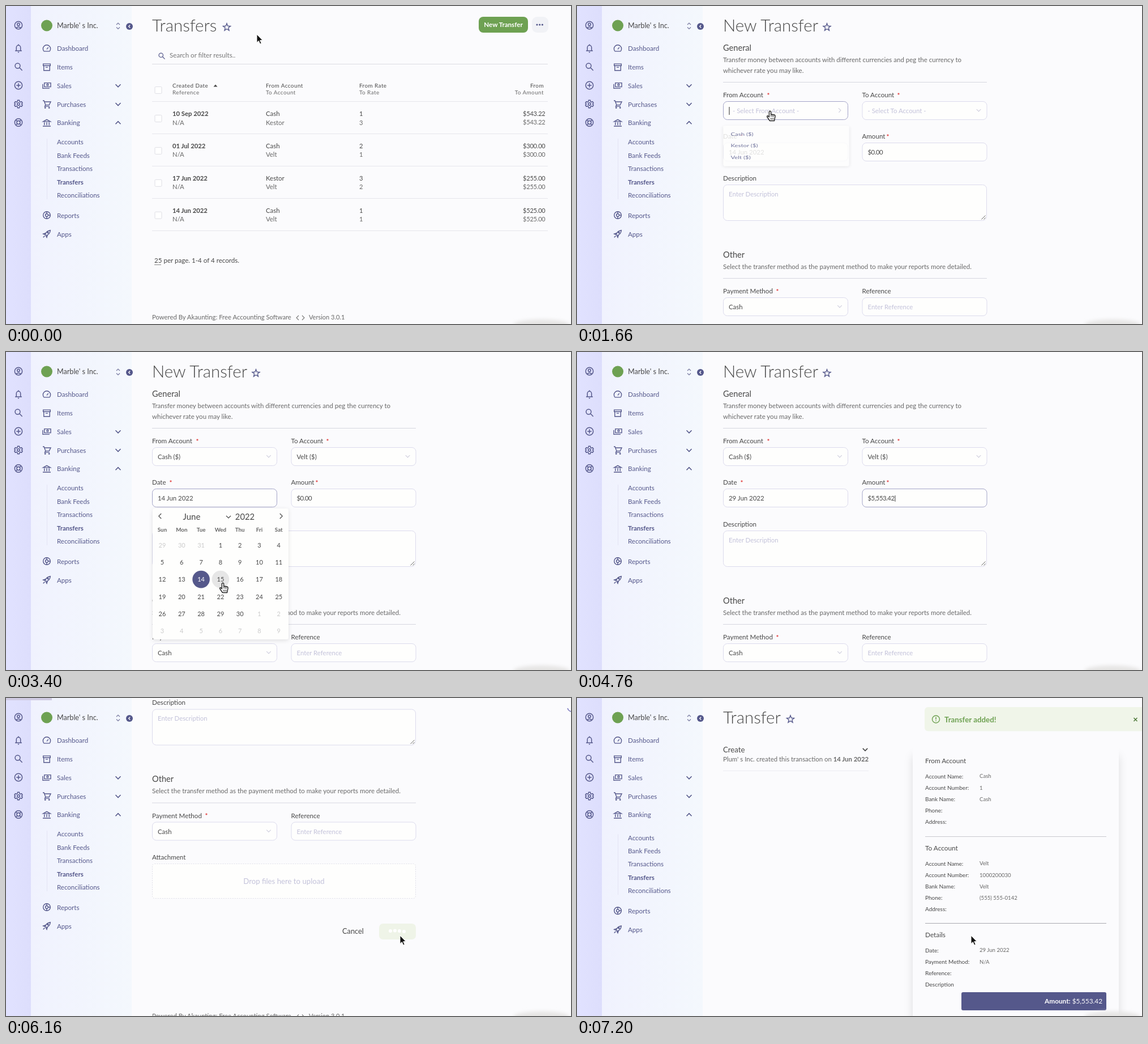
An HTML page that plays this animation: 998x561 px, repeating every 7.5 s.

```html
<!DOCTYPE html>
<html lang="en">
<head>
<meta charset="utf-8">
<title>Transfers</title>
<style>
html, body { margin: 0; width: 100%; height: 100%; overflow: hidden; background: #fbfbfd; }
svg { display: block; font-family: Lato, "Open Sans", sans-serif; white-space: pre; }
</style>
</head>
<body>
<svg id="stage" width="998" height="561" viewBox="0 0 998 561"></svg>
<script>
const LOOP = 7500, INK = '#484848', SOFT = '#686868', NAVY = '#55588b', GREEN = '#6ea152', HINT = '#c3c2da';
const stage = document.getElementById('stage');

const clamp = v => Math.max(0, Math.min(1, v));
const prog = (t, a, b) => clamp((t - a) / (b - a));
const ease = p => p < .5 ? 2 * p * p : 1 - 2 * (1 - p) ** 2;
const within = (t, a, b) => t >= a && t < b;

// y is the optical middle of the line
const text = (x, y, s, size = 11.6, fill = INK, more = '') =>
  `<text x="${x}" y="${y + size * .35}" font-size="${size}" fill="${fill}" ${more}>${s}</text>`;
const BOLD = 'font-weight="700"', MID = 'text-anchor="middle" ', END = 'text-anchor="end" ';
const rect = (x, y, w, h, fill, r = 0, more = '') =>
  `<rect x="${x}" y="${y}" width="${w}" height="${h}" rx="${r}" fill="${fill}" ${more}/>`;
const circle = (x, y, r, fill, more = '') => `<circle cx="${x}" cy="${y}" r="${r}" fill="${fill}" ${more}/>`;
const line = (d, color = NAVY, w = 1, more = '') =>
  `<path d="${d}" fill="none" stroke="${color}" stroke-width="${w}" ${more}/>`;
const rule = (x1, x2, y, color = '#e6e6ec') => line(`M${x1} ${y}H${x2}`, color);
const chevron = (x, y, turn = 0, size = 4.5, color = NAVY, w = 1.6) =>
  line(`M${-size} ${-size / 2}L0 ${size / 2}L${size} ${-size / 2}`, color, w, `transform="translate(${x},${y}) rotate(${turn})"`);
const group = (inner, more) => `<g ${more}>${inner}</g>`;

const ring = (x, y, r) => `M${x - r} ${y}a${r} ${r} 0 1 0 ${2 * r} 0a${r} ${r} 0 1 0 ${-2 * r} 0`;
const ICONS = {
  user: ring(12, 12, 9) + ring(12, 10, 3) + 'M6 18.5q6-5 12 0',
  bell: 'M4 18h16M7 18v-8a5 5 0 0 1 10 0v8M12 2.5v2.5M10.5 21.5h3',
  search: ring(10, 10, 6) + 'M14.5 14.5L21 21',
  plus: ring(12, 12, 9) + 'M12 7v10M7 12h10',
  gear: ring(12, 12, 3) + 'M10 3h4l.6 3 2.2 1.2 2.8-1 2 3.4-2.1 2.1 2.1 2.7-2 3.4-2.8-1-2.2 1.2-.6 3h-4l-.6-3-2.2-1.2-2.8 1-2-3.4 2.1-2.7-2.1-2.1 2-3.4 2.8 1 2.2-1.2z',
  help: ring(12, 12, 9) + ring(12, 12, 4) + 'M6 6l3 3M15 15l3 3M18 6l-3 3M9 15l-3 3',
  speed: 'M5 19a9.5 9.5 0 1 1 14 0zM12 14l4-5',
  box: 'M4.5 8.5v12h15v-12M3 4h18v4.5H3zM9 12.5h6',
  money: 'M6 5h16v10H6zM2 8v11h17' + ring(14, 10, 2.2),
  cart: 'M2 3h3l4 11h9l4-8H6.5M9 14l-2 3.5h12' + ring(8, 21, 1) + ring(18, 21, 1),
  bank: 'M3 9L12 4l9 5zM6 11v7M12 11v7M18 11v7M2 20.5h20',
  donut: ring(12, 12, 9) + ring(12, 12, 3.5) + 'M12 3v5.5M12 15.5v5.5M15.5 12h5.5',
  rocket: 'M8 14q2-9 13-11q-1 11-11 13zM9 10l-6 2 4.5 2M14 15l-2 6-2.5-4.5M3 21l4-4' + ring(15, 9, 1.3)
};
const icon = (name, x, y, s = .74, w = 2) =>
  line(ICONS[name], NAVY, w, `transform="translate(${x - 12 * s},${y - 12 * s}) scale(${s})"`);
const star = (x, y) => {
  const pts = [];
  for (let i = 0; i < 10; i++) {
    const a = i * Math.PI / 5, r = i % 2 ? 2.9 : 6.8;
    pts.push((x + r * Math.sin(a)).toFixed(1) + ' ' + (y + .6 - r * Math.cos(a)).toFixed(1));
  }
  return line('M' + pts.join('L') + 'Z', NAVY, 1.4);
};
const title = (s, starX) => text(258, 34.5, s, 29.5, INK, 'font-weight="300"') + star(starX, 37);

const DEFS = `<defs>
<linearGradient id="rail"><stop stop-color="#e1e2ff"/><stop offset="1" stop-color="#dddefc"/></linearGradient>
<linearGradient id="menu"><stop stop-color="#f0f2fe"/><stop offset="1" stop-color="#f4f8fd"/></linearGradient>
<filter id="shade" x="-20%" y="-20%" width="140%" height="150%"><feDropShadow dx="0" dy="2" stdDeviation="3.5" flood-color="#000" flood-opacity=".11"/></filter>
<filter id="soft" x="-20%" y="-20%" width="140%" height="140%"><feDropShadow dx="0" dy="16" stdDeviation="8" flood-color="#000" flood-opacity=".12"/></filter>
<filter id="blur" x="-30%" y="-80%" width="160%" height="260%"><feGaussianBlur stdDeviation="3"/></filter>
</defs>`;

function sidebar(shift) {
  let s = rect(0, 0, 44, 561, 'url(#rail)') + rect(44, 0, 178, 561, 'url(#menu)');
  ['user', 'bell', 'search', 'plus', 'gear', 'help'].forEach((n, i) =>
    s += icon(n, 22, [34, 74.5, 107, 140, 173, 205.5][i]));
  s += circle(72, 34.5, 10, GREEN) + text(90, 35, "Marble' s Inc.", 12.6);
  s += line('M195 33l3-3 3 3M195 37.5l3 3 3-3', '#77789f', 1.2);
  s += circle(218, 36, 6, NAVY) + line('M219.2 33.5l-2.5 2.5 2.5 2.5', '#fff', 1.3);
  [['speed', 'Dashboard'], ['box', 'Items'], ['money', 'Sales'], ['cart', 'Purchases'], ['bank', 'Banking']].forEach(([n, name], i) => {
    const y = 75 + i * 32.75;
    s += icon(n, 72, y, .7) + text(90, y + .3, name, 11.6, NAVY);
    if (i > 1) s += chevron(198, y, i == 4 ? 180 : 0);
  });
  let sub = line('M72.5 234V341', '#e3e4f3');
  ['Accounts', 'Bank Feeds', 'Transactions', 'Transfers', 'Reconciliations'].forEach((name, i) =>
    sub += text(90, 240.3 + i * 23.4, name, 11.5, NAVY, i == 3 ? BOLD : ''));
  sub += icon('donut', 72, 369, .7) + text(90, 369.5, 'Reports', 11.6, NAVY);
  sub += icon('rocket', 72, 402, .7) + text(90, 402.5, 'Apps', 11.6, NAVY);
  return s + group(sub, `transform="translate(0,${shift})"`);
}

const footer = y => text(258, y, 'Powered By Akaunting: Free Accounting Software', 11.3, SOFT) +
  line(`M517 ${y - 3}l-4 4 4 4M523 ${y - 3}l4 4-4 4`, '#777', 1.1) + text(535, y, 'Version 3.0.1', 11, SOFT);

function listPage(t) {
  let s = title('Transfers', 390);
  s += rect(835, 19, 87, 28, t > 220 ? '#638f4a' : GREEN, 8) + text(878.5, 33, 'New Transfer', 11.6, '#fff', MID + BOLD);
  s += rect(929, 19, 29, 28, '#f1f2f6', 9);
  for (let i = 0; i < 3; i++) s += circle(938 + i * 4.7, 33, 1.6, NAVY);
  s += icon('search', 275, 88, .62) + text(289, 87, 'Search or filter results..', 11.6, '#777');
  s += rule(258, 957, 102.5, '#dcdce2');
  const check = y => rect(263, y - 6, 12, 12, '#fff', 1.5, 'stroke="#dedee4"');
  const pair = (x, y, a, b, gap, size, more = '', strong = '') =>
    text(x, y, a, size, INK, more + strong) + text(x, y + gap, b, size, SOFT, more);
  const head = 'letter-spacing=".45" ';
  s += check(148.5) + `<path d="M366.5 142.5l3.5-4 3.5 4z" fill="${INK}"/>`;
  [['Created Date', 'Reference'], ['From Account', 'To Account'], ['From Rate', 'To Rate']].forEach(([a, b], i) =>
    s += pair(294 + i * 165, 140.5, a, b, 12.5, 9.9, head));
  s += pair(950, 140.5, 'From', 'To Amount', 12.5, 9.9, head + END) + rule(258, 957, 168.5);
  [['10 Sep 2022', 'Cash', 'Kestor', 1, 3, '$543.22'], ['01 Jul 2022', 'Cash', 'Velt', 2, 1, '$300.00'],
   ['17 Jun 2022', 'Kestor', 'Velt', 3, 2, '$255.00'], ['14 Jun 2022', 'Cash', 'Velt', 1, 1, '$525.00']].forEach((r, i) => {
    const y = 190 + i * 56.9;
    s += check(y + 8.5) + pair(294, y, r[0], 'N/A', 15.6, 11.3, '', BOLD) + pair(459, y, r[1], r[2], 15.6, 11.4) +
      pair(624, y, r[3], r[4], 15.6, 11.2) + pair(952.5, y, r[5], r[5], 15.6, 11, 'letter-spacing="-.2" ' + END) +
      rule(258, 957, Math.round(y + 35) + .5);
  });
  return s + text(262, 449, '25 per page. 1-4 of 4 records.') + rule(262, 274, 456.5, '#888') + footer(549);
}

// Opening amounts of the two account lists
const openFrom = t => t < 1960 ? prog(t, 1530, 1710) : 1 - prog(t, 1960, 2060);
const openTo = t => t < 2720 ? prog(t, 2350, 2530) : 1 - prog(t, 2720, 2820);

const label = (x, y, s, starX) => text(x, y, s) + (starX ? text(starX, y + 1, '*', 10.5, '#e02d2d', MID + BOLD) : '');
const box = (x, y, w, h, focus) => rect(x, y, w, h, '#fefefd', 7, `stroke="${focus ? '#a3a4c8' : '#dcdbed'}"`);
function field(x, y, s, o = {}) {
  const shift = o.open ? 7 : 0;
  let out = box(x + .5, y + .5, 220, 32, o.focus) + text(x + 10 + shift, y + 17.5, s, 11.4, o.hint ? HINT : INK, o.more);
  if (o.open) out += line(`M${x + 11} ${y + 10}v14`, INK, 1.2);
  if (o.select) out += chevron(x + 206, y + 16, -180 * (o.open || 0) ** 2, 3.8, '#cfcedd', 1.1);
  return out;
}
function dropdown(x, p) {
  if (!p) return '';
  let s = rect(0, 0, 222, 98, '#fefefd', 4, 'filter="url(#shade)"');
  ['Cash ($)', 'Kestor ($)', 'Velt ($)'].forEach((v, i) => s += text(13, 20.5 + i * 28.3, v, 11.4, NAVY));
  return group(s, `transform="translate(${x},211) scale(1,${p})" opacity="${Math.min(1, .15 + p * .95)}"`);
}

function calendar(t, cur) {
  const p = t < 3680 ? prog(t, 3010, 3110) : 1 - prog(t, 3680, 3740);
  if (!p) return '';
  let s = rect(259, 276, 240, 231, '#fefefd', 4, 'filter="url(#shade)"');
  s += chevron(272, 289.5, 90, 4.5, INK, 1.1) + chevron(486, 289.5, -90, 4.5, INK, 1.1) + chevron(393, 291, 0, 4, INK, 1.2);
  s += text(328, 291, 'June', 15, INK, MID) + text(422, 291, '2022', 14.8, INK, MID);
  const hoverCol = Math.round((cur.x - 276) / 34.3), hoverRow = Math.round((cur.y - 340.5) / 30.3);
  for (let c = 0; c < 7; c++) {
    const x = 276 + c * 34.3;
    s += text(x, 313.5, ['Sun', 'Mon', 'Tue', 'Wed', 'Thu', 'Fri', 'Sat'][c], 9.8, '#666', MID + BOLD);
    for (let r = 0; r < 6; r++) {
      const n = r * 7 + c - 2, y = 340.5 + r * 30.3, out = n < 1 || n > 30;
      if (n == 14) s += circle(x, y, 15.3, NAVY);
      else if (c == hoverCol && r == hoverRow) s += circle(x, y, 15.3, '#e6e6e6');
      s += text(x, y + .5, n < 1 ? n + 31 : n > 30 ? n - 30 : n, 11, n == 14 ? '#fff' : out ? '#cbcbcb' : INK, MID);
    }
  }
  return group(s, `opacity="${p}"`);
}

const AMOUNTS = ['$5', '$55', '$555', '$5,553.4', '$5,553.42'];
function formPage(t, cur) {
  const from = openFrom(t), to = openTo(t);
  const typed = t < 4160 ? '$0.00' : AMOUNTS[Math.min(4, Math.floor((t - 4160) / 60))];
  const amountFocus = t >= 3930;
  const caret = amountFocus && !within(t, 4600, 4760) ? '<tspan fill="#111">|</tspan>' : '';
  let s = title('New Transfer', 441.5);
  s += text(258, 74, 'General', 14.6) + text(258, 94.5, 'Transfer money between accounts with different currencies and peg the currency to', 11.5, SOFT) +
    text(258, 113.5, 'whichever rate you may like.', 11.5, SOFT) + rule(258, 724, 134.5, '#d6d7e0');
  s += label(258, 157, 'From Account', 338) + label(503.5, 157, 'To Account', 568);
  s += field(258, 168, t < 1960 ? '- Select From Account -' : 'Cash ($)', { select: 1, open: from, focus: within(t, 1530, 1990), hint: t < 1960 });
  s += field(503.5, 168, t < 2720 ? '- Select To Account -' : 'Velt ($)', { select: 1, open: to, focus: within(t, 2350, 2760), hint: t < 2720 });
  s += label(258, 230, 'Date', 291) + label(503.5, 230, 'Amount', 549);
  s += field(258, 241, t < 3680 ? '14 Jun 2022' : '29 Jun 2022', { focus: within(t, 3000, 3740) });
  s += field(503.5, 241, typed + caret, { focus: amountFocus, more: 'letter-spacing="-.5"' });
  s += label(258, 303.5, 'Description') + box(258.5, 315.5, 465, 63, false) + text(268, 332, 'Enter Description', 11.4, HINT);
  s += line('M714.5 376.5l7-7M718.5 376.5l3-3', '#666');
  s += text(258, 438.5, 'Other', 14.6) + text(258, 459.5, 'Select the transfer method as the payment method to make your reports more detailed.', 11.5, SOFT) +
    rule(258, 724, 480.5, '#d6d7e0');
  s += label(258, 503, 'Payment Method', 354) + label(503.5, 503, 'Reference');
  s += field(258, 514, 'Cash', { select: 1 }) + field(503.5, 514, 'Enter Reference', { hint: 1 });
  s += label(258, 576, 'Attachment') + rect(258.5, 588, 465, 61, '#fefefd', 4, 'stroke="#dfdfe8" stroke-dasharray="2 2"') +
    text(491, 619, 'Drop files here to upload', 13.2, HINT, MID);
  const saving = prog(t, 5680, 5780);
  s += text(594, 707.5, 'Cancel', 12.8) + rect(659, 693.5, 65, 28, '#eff4e8', 7) +
    group(rect(659, 693.5, 65, 28, t > 5520 ? '#638f4a' : GREEN, 7) + text(691.5, 707.5, 'Save', 11.8, '#fff', MID + BOLD), `opacity="${1 - saving}"`);
  if (saving) for (let i = 0; i < 4; i++) s += circle(679 + i * 8, 707 + Math.sin(t / 90 - i), 3, '#fff', `opacity="${saving}"`);
  s += footer(857);
  s += dropdown(258.5, from) + dropdown(503.5, to) + calendar(t, cur);
  const scroll = 295.5 * (1 - (1 - prog(t, 4930, 5200)) ** 2);
  return group(s, `transform="translate(0,${-scroll})"`);
}

function resultPage(t) {
  let s = title('Transfer', 377);
  s += text(258, 91, 'Create', 13.2) + chevron(509, 91, 0, 4.2, INK) +
    text(258, 108, `Plum' s Inc. created this transaction on <tspan ${BOLD}>14 Jun 2022</tspan>`, 11.4, SOFT) + rule(258, 515, 128.5, '#ececf2');
  let card = rect(593, 85, 364, 500, '#fbfbfd', 8, 'filter="url(#soft)"');
  const section = (y, name, keys, values) => {
    card += text(615, y, name, 11.8);
    keys.forEach((k, i) => card += text(615, y + 27 + i * 20.2, k, 10) + text(711, y + 27 + i * 20.2, values[i] || '', 9.6, SOFT));
  };
  const keys = ['Account Name:', 'Account Number:', 'Bank Name:', 'Phone:', 'Address:'];
  section(111, 'From Account', keys, ['Cash', '1', 'Cash']);
  section(265, 'To Account', keys, ['Velt', '1000200030', 'Velt', '(555) 555-0142']);
  section(418, 'Details', ['Date:', 'Payment Method:', 'Reference:', 'Description'], ['29 Jun 2022', 'N/A']);
  card += rule(615, 935, 244.5, '#c9c9cf') + rule(615, 935, 397.5, '#a9a9b0');
  card += rect(679, 519, 256, 32, NAVY, 3) + text(928, 535, `<tspan ${BOLD}>Amount:</tspan> $5,553.42`, 11.8, '#fff', END);
  s += group(card, `opacity="${prog(t, 6700, 6860)}"`);
  const p = prog(t, 6900, 7190);
  const toast = rect(614, 16, 392, 42.5, '#f0f5e9', 6) + circle(634, 37.5, 6.5, 'none', `stroke="${GREEN}" stroke-width="1.4"`) +
    line('M634 33.5v4.5M634 39.5v1.6', GREEN, 1.5) + text(649, 38, 'Transfer added!', 13.3, GREEN, BOLD) +
    line('M983.5 35l6 6M989.5 35l-6 6', '#4f7a3a', 1.5);
  return s + group(toast, `opacity="${p}" transform="translate(${40 * (1 - ease(p))},0)"`);
}

// Pointer stops: time, x, y
const PATH = [[60, 443, 50], [260, 878, 34], [1080, 878, 34], [1480, 341, 185], [1760, 341, 185], [1880, 300, 230], [2000, 300, 230],
  [2290, 578, 169], [2530, 578, 169], [2650, 545, 286], [2760, 545, 286], [3000, 400, 256], [3100, 400, 256], [3260, 383, 407],
  [3430, 383, 407], [3580, 379, 460], [3720, 379, 460], [3960, 581, 253], [5360, 581, 253], [5560, 696, 419]];
function pointerAt(t) {
  const i = PATH.findIndex(k => k[0] > t);
  if (i == 0) return { x: 443, y: 50 };
  if (i < 0) return { x: 696, y: 419 };
  const a = PATH[i - 1], b = PATH[i], p = ease(prog(t, a[0], b[0]));
  return { x: a[1] + (b[1] - a[1]) * p, y: a[2] + (b[2] - a[2]) * p };
}
function pointer(t, { x, y }) {
  if (within(t, 4160, 5360)) return '';
  const at = `transform="translate(${x},${y})" stroke-linejoin="round"`;
  if (within(t, 3870, 4160)) return line('M-3-9q3 0 3 2V7q0 2-3 2M3-9q-3 0-3 2M0 7q0 2 3 2', '#222', 1.2, at);
  const arrow = t < 220 || within(t, 1130, 1420) || within(t, 5360, 5520) || t >= 5760;
  if (arrow) return `<path d="M0 0V14.5L3.4 11.4 5.7 17 8.2 16 5.8 10.6H10.3Z" fill="#111" stroke="#fff" ${at}/>`;
  return group('<path d="M-1.6 1.5Q0-1 1.6 1.5V6L7.500 7q1.800.6 1.500 3L7.500 17.500H-.5L-5 11q-1-2.500 1-2.200l2.400 2z" fill="#fff" stroke="#222" stroke-width="1.4"/>' +
    line('M1.6 6v4M3.8 7v3.5M6 7.500v3.500M1.500 12.500v3M3.700 12.500v3M5.900 12.500v3', '#222', .9), at);
}

function loader(t) {
  const span = [[2050, 2300, 2400, 2500], [2800, 3000, 3080, 3180], [5800, 6080, 6130, 6230]].find(r => within(t, r[0], r[3]));
  if (!span) return '';
  const [a, b, c] = span, last = a > 5000, fading = t >= c;
  const left = !last && fading ? 218 : 0;
  const right = last && fading ? 81 : 998 * ease(prog(t, a, b));
  const bar = rect(left, 0, Math.max(0, right - left), 4, fading ? '#d0cbe3' : '#8d8fb6');
  if (fading && !last) return bar;
  return bar + line('M992 18a8 8 0 0 0 8 6', '#8583c4', 1.8, `transform="rotate(${fading ? 0 : t * .9},1000,16)"`);
}

function draw(t) {
  const cur = pointerAt(t);
  const page = t < 1000 ? listPage(t) : t < 6700 ? formPage(t, cur) : resultPage(t);
  stage.innerHTML = DEFS + rect(0, 0, 998, 561, '#fbfbfd') + page + sidebar(t < 6700 ? 0 : 6.3) +
    '<ellipse cx="946" cy="562" rx="49" ry="9" fill="#e6e5e4" filter="url(#blur)"/>' + loader(t) + pointer(t, cur);
}
function tick() {
  draw(performance.now() % LOOP);
  requestAnimationFrame(tick);
}
tick();
</script>
</body>
</html>
```
